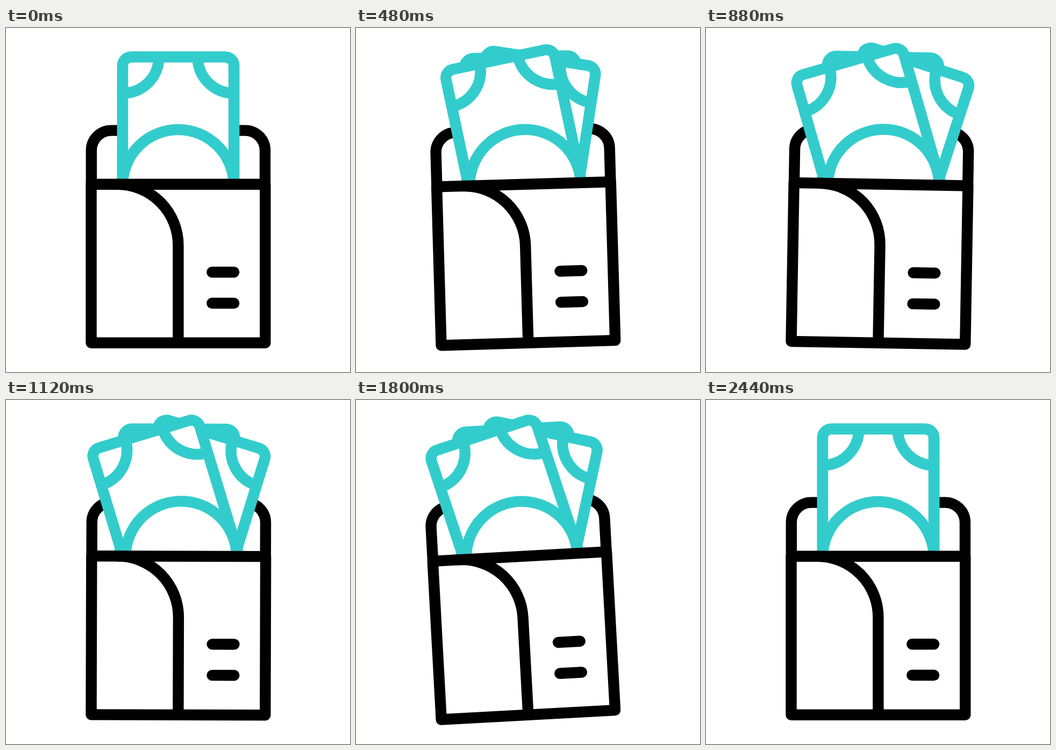
Animation, 640 px wide and 640 px high, one loop 2.64 s. Source, as an HTML page with a canvas:

```html
<!DOCTYPE html>
<html lang="en">
<head>
<meta charset="utf-8">
<title>Wallet</title>
<style>
  html, body { margin: 0; width: 100%; height: 100%; overflow: hidden; background: #fff; }
  canvas { display: block; width: 100vw; height: 100vh; }
</style>
</head>
<body>
<canvas id="stage" width="640" height="640"></canvas>
<script>
const ctx = document.getElementById('stage').getContext('2d');
const LOOP = 2640, STEP = 40;
const TEAL = '#33cccc', BLACK = '#000', WHITE = '#fff';
const CX = 320.4;
const LEFT = 158.5, RIGHT = 482.3, TOP = 290.7, BOTTOM = 585.8;
const BILL_LEFT = 217, BILL_RIGHT = 424, BILL_TOP = 54, BILL_PIVOT = 277;

// [time in ms, angle in degrees]
const SWING = [[0, 0], [320, 2], [600, -4], [880, 1], [1200, 0],
               [1480, 0], [1855, -3.3], [2120, 5], [2440, 0]];
const SPREAD = [[320, 0], [600, 17], [1720, 17], [2120, 0]];

function valueAt(keys, t) {
  if (t <= keys[0][0]) return keys[0][1];
  for (let i = 1; i < keys.length; i++) {
    const [t0, a] = keys[i - 1], [t1, b] = keys[i];
    if (t <= t1) {
      const p = (t - t0) / (t1 - t0);
      return a + (b - a) * p * p * (3 - 2 * p);
    }
  }
  return keys[keys.length - 1][1];
}

function rotateAbout(x, y, degrees) {
  ctx.translate(x, y);
  ctx.rotate(degrees * Math.PI / 180);
  ctx.translate(-x, -y);
}

function shape(build, fill) {
  ctx.beginPath();
  build();
  if (fill) {
    ctx.fillStyle = fill;
    ctx.fill();
  }
  ctx.stroke();
}

function drawBill(angle) {
  ctx.save();
  rotateAbout(CX, BILL_PIVOT, angle);
  ctx.strokeStyle = TEAL;
  shape(() => ctx.roundRect(BILL_LEFT, BILL_TOP, BILL_RIGHT - BILL_LEFT, 346, 16), WHITE);
  shape(() => ctx.arc(BILL_LEFT, BILL_TOP, 67.5, 0.1, Math.PI / 2 - 0.1));
  shape(() => ctx.arc(BILL_RIGHT, BILL_TOP, 67.5, Math.PI / 2 + 0.1, Math.PI - 0.1));
  shape(() => ctx.arc(CX, 292.5, 103.5, 0, Math.PI * 2));
  ctx.restore();
}

function drawWalletBack() {
  ctx.strokeStyle = BLACK;
  shape(() => {
    ctx.moveTo(LEFT + 0.3, TOP);
    ctx.arcTo(LEFT + 0.3, 190.6, CX, 190.6, 37);
    ctx.arcTo(RIGHT - 0.3, 190.6, RIGHT - 0.3, TOP, 37);
    ctx.lineTo(RIGHT - 0.3, TOP);
  });
}

function drawWalletFront() {
  ctx.strokeStyle = BLACK;
  shape(() => ctx.rect(LEFT, TOP, RIGHT - LEFT, BOTTOM - TOP), WHITE);
  shape(() => {
    ctx.arc(206.8, TOP + 113.6, 113.6, -Math.PI / 2, 0);
    ctx.lineTo(CX, BOTTOM);
  });
  for (const y of [454.2, 512]) {
    shape(() => {
      ctx.moveTo(383.3, y);
      ctx.lineTo(424.1, y);
    });
  }
}

function draw(t) {
  const spread = valueAt(SPREAD, t);
  ctx.fillStyle = WHITE;
  ctx.fillRect(0, 0, 640, 640);
  ctx.save();
  ctx.lineWidth = 20.4;
  ctx.lineCap = ctx.lineJoin = 'round';
  rotateAbout(CX, BOTTOM, valueAt(SWING, t));
  drawWalletBack();
  for (const side of [0, 1, -1]) drawBill(side * spread);
  drawWalletFront();
  ctx.restore();
}

const start = performance.now();
function tick() {
  const t = (performance.now() - start) % LOOP;
  draw(Math.floor(t / STEP) * STEP);
  requestAnimationFrame(tick);
}
tick();
</script>
</body>
</html>
```
